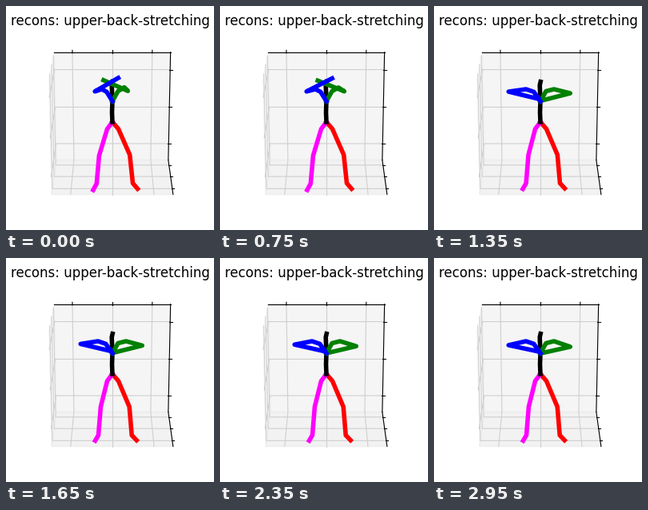
These frames come from a looping animation (260x280 px, 3 s). A matplotlib script:

```python
import numpy as np
import matplotlib.pyplot as plt
from matplotlib.animation import FuncAnimation

W, H, DPI = 260, 280, 100
FRAMES, INTERVAL = 60, 50

fig = plt.figure(figsize=(W / DPI, H / DPI), dpi=DPI, facecolor="white")
ax = fig.add_axes([0, 0, 1, 1])
ax.set_xlim(0, W)
ax.set_ylim(H, 0)
ax.axis("off")

# Perspective box: cube [-1, 1]^3 seen from a raised camera
HALF = np.array([0.5953, 0.5953, 0.4465])
ELEV = np.radians(110)
DIST, SCALE = 10, 1248.6
CENTER = np.array([132.9, 144.7])
TICKS = np.array([-1, 0, 1]) * 0.686


def project(x, y, z):
    x, y, z = HALF * (x, y, z)
    up = np.sin(ELEV) * y + np.cos(ELEV) * z
    depth = -np.cos(ELEV) * y + np.sin(ELEV) * z
    return CENTER + SCALE / (DIST - depth) * np.array([x, -up])


def stroke(*corners, **style):
    ax.plot(*np.transpose([project(*c) for c in corners]), **style)


def pane(shade, *corners):
    color = (shade,) * 3 + (0.5,)
    ax.add_patch(plt.Polygon([project(*c) for c in corners],
                             facecolor=color, edgecolor=color, lw=1, zorder=0))


def draw_box():
    pane(0.95, (-1, -1, -1), (-1, 1, -1), (-1, 1, 1), (-1, -1, 1))
    pane(0.90, (-1, -1, -1), (1, -1, -1), (1, -1, 1), (-1, -1, 1))
    pane(0.925, (-1, -1, -1), (1, -1, -1), (1, 1, -1), (-1, 1, -1))

    grid = dict(color="#cfcfcf", lw=0.8, zorder=1)
    axis = dict(color="black", lw=0.8, zorder=2)
    near, far = 1 - 1 / 60, 1 + 1 / 30
    for t in TICKS:
        stroke((t, 1, -1), (t, -1, -1), (t, -1, 1), **grid)
        stroke((1, t, -1), (-1, t, -1), (-1, t, 1), **grid)
        stroke((1, -1, t), (-1, -1, t), (-1, 1, t), **grid)
        stroke((t, near, -1), (t, far, -1), **axis)
        stroke((near, t, -1), (far, t, -1), **axis)
        stroke((near, -1, t), (far, -1, t), **axis)
    for end in [(-1, 1, -1), (1, -1, -1)]:
        stroke(end, (1, 1, -1), **axis)
    stroke((1, -1, -1), (1, -1, 1), **axis)


ROOT, CHEST = (133, 145), (133, 119)
SPINE = [ROOT, (132.5, 133), CHEST, (132.2, 99), (133.2, 94.7)]

# Collar, shoulder, elbow, wrist: arms folded, then crossed overhead
LEFT_ARM = np.array([[(124.7, 107.3), (115, 104), (93.2, 105.5), (131, 115.5)],
                     [(126, 107.3), (120.5, 104), (114, 107), (141.8, 85.8)]])
RIGHT_ARM = np.array([[(140, 106.5), (150, 104), (170.3, 107.5), (136.5, 117)],
                      [(140, 106.5), (147.5, 101.3), (149.5, 106), (119.5, 88.8)]])
# Hip, knee, ankle, toe: settled, then wide stance
LEFT_LEG = np.array([[(126.5, 153.7), (118.4, 186), (115.5, 221.5), (111.5, 228.3)],
                     [(126.5, 153.7), (116.4, 187), (113.3, 222), (109, 230)]])
RIGHT_LEG = np.array([[(140.5, 153.7), (154.2, 186), (157.2, 221.5), (163.2, 227.8)],
                      [(140.5, 153.7), (154.7, 186), (158.5, 221.5), (164.5, 228.5)]])

ARM_LAG = np.array([0, 0, -0.6, 1])   # elbows lead, wrists trail
ARM_SAG = np.array([0, 0, 3.5, 1.5])  # slow droop over the loop


def ease(f, start, end):
    u = np.clip((f - start) / (end - start), 0, 1)
    return u * u * (3 - 2 * u)


def blend(poses, w):
    return poses[0] + (poses[1] - poses[0]) * np.reshape(w, (-1, 1))


def arm(poses, f):
    t = f - ARM_LAG
    lift = 0.86 + 0.14 * ease(t, 0, 9) - ease(t, 10, 26)
    pts = blend(poses, lift)
    pts[:, 1] += ARM_SAG * f / FRAMES * (1 - lift)
    return np.vstack([CHEST, pts])


def leg(poses, f):
    return np.vstack([ROOT, blend(poses, 1 - ease(f, 14, 32))])


def pose(f):
    return (leg(RIGHT_LEG, f), leg(LEFT_LEG, f), np.array(SPINE),
            arm(RIGHT_ARM, f), arm(LEFT_ARM, f))


draw_box()
ax.text(130.25, 24.5, "recons: upper-back-stretching", fontsize=12,
        family="DejaVu Sans", ha="center", va="baseline")
limbs = [ax.plot([], [], color=c, lw=4, zorder=3)[0]
         for c in ("red", "magenta", "black", "green", "blue")]


def update(f):
    for line, pts in zip(limbs, pose(f)):
        line.set_data(*pts.T)
    return limbs


anim = FuncAnimation(fig, update, frames=FRAMES, interval=INTERVAL,
                     repeat=True, repeat_delay=0)
plt.show()
```
